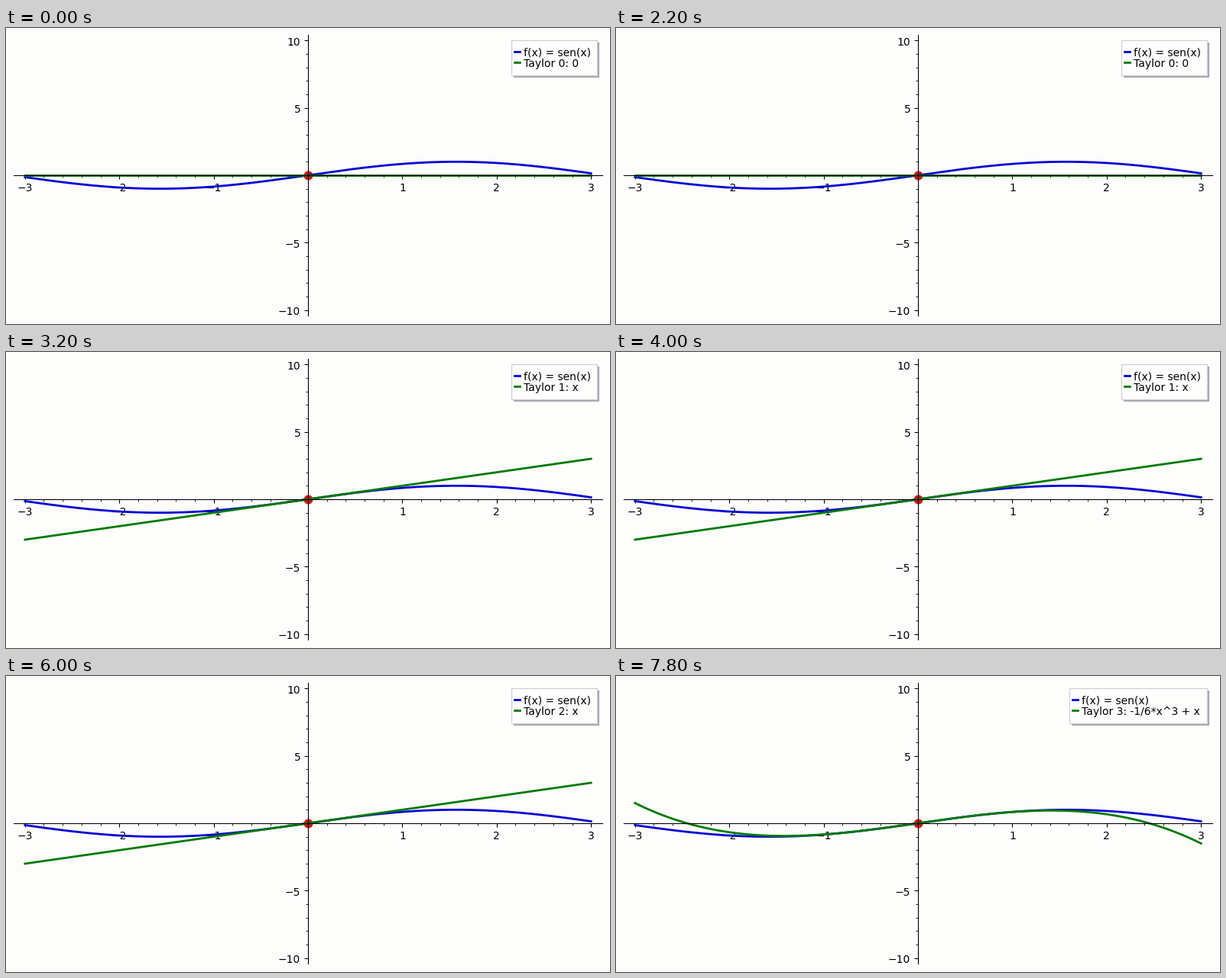
Animation of 790 by 388 pixels, one loop 8 s. Source, as a matplotlib script:

```python
import numpy as np
import matplotlib.pyplot as plt
from matplotlib.animation import FuncAnimation
from matplotlib.patches import Rectangle
from matplotlib.ticker import MultipleLocator
from matplotlib.transforms import Affine2D

W, H, DPI = 790, 388, 100
FRAMES, INTERVAL = 40, 200
HOLD = 12  # frames spent on each degree
PAPER, BLUE, GREEN, RED = "#fdfdfc", "#0404d4", "#007a00", "#e01010"

plt.rcParams.update({"font.family": "DejaVu Sans", "font.size": 10})

x = np.linspace(-3, 3, 300)
STEPS = [
    ("Taylor 0: 0", 0 * x),
    ("Taylor 1: x", x),
    ("Taylor 2: x", x),
    ("Taylor 3: -1/6*x^3 + x", x - x**3 / 6),
]

fig = plt.figure(figsize=(W / DPI, H / DPI), dpi=DPI, facecolor=PAPER)

# Plot with its axes crossing at the origin
left, right, top, bottom = 10, 780, 9.23, 376.77
ax = fig.add_axes([left / W, 1 - bottom / H, (right - left) / W, (bottom - top) / H])
ax.set(xlim=(-3.12, 3.12), ylim=(-10.4, 10.4), facecolor="none",
       xticks=[-3, -2, -1, 1, 2, 3], yticks=[-10, -5, 5, 10])
ax.xaxis.set_minor_locator(MultipleLocator(0.2))
ax.yaxis.set_minor_locator(MultipleLocator(1))
for side in ("left", "bottom"):
    ax.spines[side].set_position("zero")
for side in ("right", "top"):
    ax.spines[side].set_visible(False)


def lower_labels(axis, pixels):
    for label in axis.get_ticklabels():
        label.set_transform(label.get_transform() + Affine2D().translate(0, -pixels))


lower_labels(ax.xaxis, 0.5)
lower_labels(ax.yaxis, 1)

ax.scatter([0], [0], s=75, c=RED, linewidths=0, zorder=0)
ax.plot(x, np.sin(x), color=BLUE, lw=2)
approx, = ax.plot(x, STEPS[0][1], color=GREEN, lw=2)

# Legend in pixel coordinates
overlay = fig.add_axes([0, 0, 1, 1], facecolor="none")
overlay.set(xlim=(0, W), ylim=(H, 0))
overlay.axis("off")

BOX_RIGHT, BOX_TOP, BOX_HEIGHT = 773, 16, 46
shadow = overlay.add_patch(Rectangle((0, 0), 1, BOX_HEIGHT, fc="#a6a6b0", lw=0))
box = overlay.add_patch(Rectangle((0, 0), 1, BOX_HEIGHT, fc=PAPER, ec="#cfcfd8", lw=0.9))


def legend_row(y, color):
    handle, = overlay.plot([], [], color=color, lw=2)
    label = overlay.text(0, y + 5, "", va="baseline")
    return handle, label, y


rows = [legend_row(32, BLUE), legend_row(46, GREEN)]


def draw_legend(label):
    x0 = 593 if len(label) > 12 else 661
    box.set_xy((x0, BOX_TOP))
    shadow.set_xy((x0 + 3, BOX_TOP + 3))
    for patch in (box, shadow):
        patch.set_width(BOX_RIGHT - x0)
    for (handle, text, y), content in zip(rows, ("f(x) = sen(x)", label)):
        handle.set_data([x0 + 4.4, x0 + 11.4], [y - 1, y - 1])
        text.set_text(content)
        text.set_x(x0 + 16)


def update(frame):
    label, values = STEPS[frame // HOLD]
    approx.set_ydata(values)
    draw_legend(label)
    return []


anim = FuncAnimation(fig, update, frames=FRAMES, interval=INTERVAL,
                     repeat=True, repeat_delay=0)
plt.show()
```
